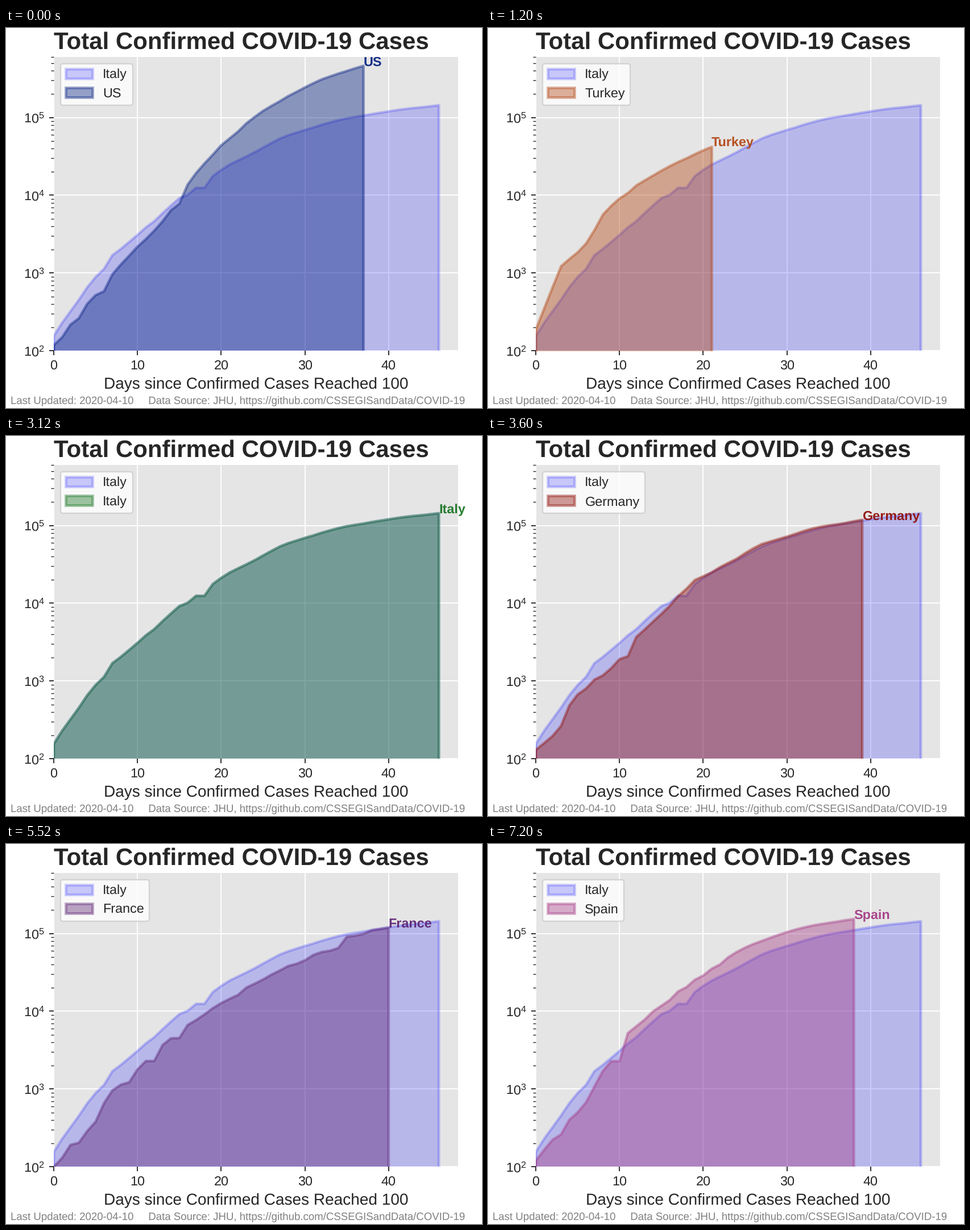
A matplotlib script for the animation above (8 s loop, 837 px wide and 669 px high).

```python
import matplotlib.pyplot as plt
from matplotlib.animation import FuncAnimation

W, H, DPI = 837, 669, 168
LEFT, RIGHT, TOP, BOTTOM = 84, 795, 51, 568.2
INK = "#262626"

plt.rcParams.update({
    "font.family": "Liberation Sans",
    "text.hinting": "none",
    "text.color": INK,
    "axes.labelcolor": INK,
    "xtick.color": INK,
    "ytick.color": INK,
})

# Confirmed cases per day, starting on the day each country passed 100
italy = [155, 229, 322, 453, 655, 888, 1128, 1694, 2036, 2502, 3089, 3858,
         4636, 5883, 7375, 9172, 10149, 12462, 12462, 17660, 21157, 24747,
         27980, 31506, 35713, 41035, 47021, 53578, 59138, 63927, 69176,
         74386, 80589, 86498, 92472, 97689, 101739, 105792, 110574, 115242,
         119827, 124632, 128948, 132547, 135586, 139422, 143626]
us = [118, 149, 217, 262, 402, 518, 583, 959, 1281, 1663, 2179, 2727, 3499,
      4632, 6421, 7783, 13747, 19273, 25600, 33276, 43847, 53740, 65778,
      83836, 101657, 121478, 140886, 161807, 188172, 213372, 243453, 275586,
      308850, 337072, 366614, 396223, 429052, 461437]
turkey = [192, 359, 670, 1236, 1529, 1872, 2433, 3629, 5698, 7402, 9217,
          10827, 13531, 15679, 18135, 20921, 23934, 27069, 30217, 34109,
          38226, 42282]
germany = [130, 159, 196, 262, 482, 670, 799, 1040, 1176, 1457, 1908, 2078,
           3675, 4585, 5795, 7272, 9257, 12327, 15320, 19848, 22213, 24873,
           29056, 32986, 37323, 43938, 50871, 57695, 62095, 66885, 71808,
           77872, 84794, 91159, 96092, 100123, 103374, 107663, 113296, 118181]
france = [100, 130, 191, 204, 288, 380, 656, 957, 1134, 1217, 1784, 2290,
          2290, 3675, 4487, 4523, 6668, 7699, 9105, 10947, 12726, 14431,
          16176, 20104, 22622, 25600, 29551, 33402, 38105, 40708, 45170,
          52827, 57749, 59929, 65202, 90848, 93773, 98963, 110065, 114000,
          118781]
uk = [116, 164, 207, 274, 322, 384, 459, 459, 802, 1144, 1145, 1551, 1960,
      2642, 2716, 4014, 5067, 5745, 6726, 8164, 9640, 11812, 14745, 17312,
      19780, 22453, 25481, 29865, 34173, 38689, 42477, 48436, 52279, 55949,
      61474, 65872]
spain = [120, 165, 222, 259, 400, 500, 673, 1073, 1695, 2277, 2277, 5232,
         6391, 7798, 9942, 11748, 13910, 17963, 20410, 25374, 28768, 35136,
         39885, 49515, 57786, 65719, 73235, 80110, 87956, 95923, 104118,
         112065, 119199, 126168, 131646, 136675, 141942, 148220, 153222]

scenes = [
    ("US", us, "#001C7F"),
    ("Turkey", turkey, "#B1400D"),
    ("Italy", italy, "#12711C"),
    ("Germany", germany, "#8C0800"),
    ("France", france, "#591E71"),
    ("United Kingdom", uk, "#592F0D"),
    ("Spain", spain, "#A23582"),
]

# The small margin keeps the pixel size from being rounded down
fig = plt.figure(figsize=((W + 0.01) / DPI, (H + 0.01) / DPI), dpi=DPI,
                 facecolor="white")
ax = fig.add_axes([LEFT / W, 1 - BOTTOM / H,
                   (RIGHT - LEFT) / W, (BOTTOM - TOP) / H])
ax.set_facecolor("#E5E5E5")
ax.set_yscale("log")
ax.set_xlim(0, 48.3)
ax.set_ylim(100, 6e5)
ax.set_xticks(range(0, 50, 10))
ax.set_axisbelow(True)
ax.grid(True, which="major", color="white", lw=0.8)
ax.spines[:].set_visible(False)
ax.set_title("Total Confirmed COVID-19 Cases", loc="left", size=18,
             weight="bold")
ax.set_xlabel("Days since Confirmed Cases Reached 100", size=12)
fig.text(7.6 / W, 1 - 662.5 / H,
         "Last Updated: 2020-04-10     Data Source: JHU, "
         "https://github.com/CSSEGISandData/COVID-19",
         size=8, color="#808080")


def area(cases, color, alpha, label):
    return ax.fill_between(range(len(cases)), cases, 1, color=color,
                           alpha=alpha, lw=2, label=label)


base = area(italy, "blue", 0.2, "Italy")
shown = []


def draw(i):
    while shown:
        shown.pop().remove()
    name, cases, color = scenes[i // 3]  # three ticks of 400 ms per country
    fill = area(cases, color, 0.4, name)
    tag = ax.text(len(cases) - 1, cases[-1], name, size=10, weight="bold",
                  color=color, alpha=0.9)
    shown.extend([fill, tag])
    ax.legend(handles=[base, fill], loc="upper left", fontsize=10)
    return shown


anim = FuncAnimation(fig, draw, frames=20, interval=400, repeat=True,
                     repeat_delay=0, blit=False)
plt.show()
```
